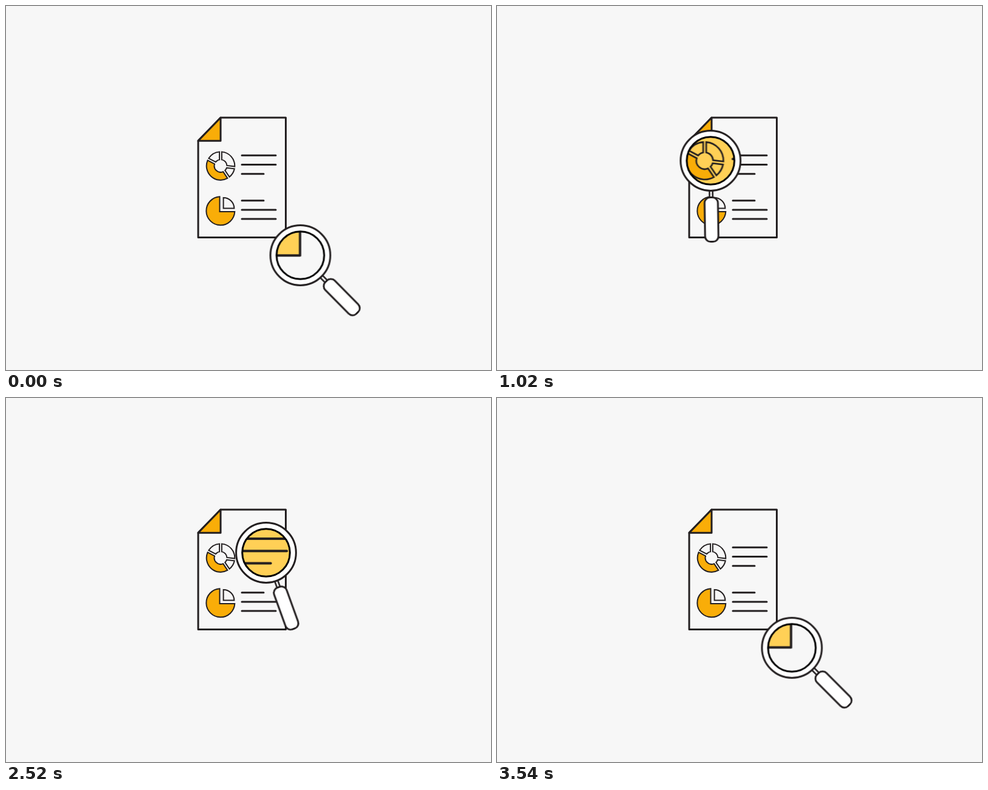
These frames come from a looping animation (800 by 600 pixels, 3.73 s). An HTML page:

```html
<!DOCTYPE html>
<html lang="en">
<head>
<meta charset="utf-8">
<title>Report under a magnifying glass</title>
<style>
  html, body { margin: 0; width: 100%; height: 100%; overflow: hidden; background: #f7f7f7; }
  svg { display: block; width: 100vw; height: 100vh; }
  .ink { stroke: #231f20; stroke-width: 3; stroke-linejoin: round; stroke-linecap: round; }
  .chart { stroke-width: 2; stroke-linejoin: miter; }
  .hot { fill: #f9ad08; }
  .white { fill: #fff; }
</style>
</head>
<body>
<svg viewBox="0 0 800 600">
  <defs>
    <clipPath id="glass"><circle r="39.3"/></clipPath>
    <g id="page" class="ink" fill="currentColor">
      <path d="M354 184H461.5V381.5H317V222Z"/>
      <path class="hot" d="M354 184V222.3H317Z"/>
      <g id="donut" class="chart" transform="translate(354 263.6)"></g>
      <g class="chart">
        <path class="hot" d="M352.5 339V314.3A23.5 23.5 0 1 0 377.3 339Z"/>
        <path d="M358.6 333.4V316A17.8 17.8 0 0 1 376.4 333.4Z"/>
      </g>
      <path d="M389 246.2h56M389 261.5h56M389 276.7h36M389 320.8h36M389 336h56M389 351h56"/>
    </g>
  </defs>

  <use href="#page" color="#f7f7f7"/>

  <g id="lens">
    <g id="handle" class="ink white">
      <path d="M-2.6 47V64H2.6V47Z" stroke-width="2.6"/>
      <rect x="-11" y="60.6" width="22" height="73" rx="9"/>
    </g>
    <circle class="ink white" r="49.4"/>
    <circle r="39.3" fill="#f7f7f7"/>
    <g clip-path="url(#glass)">
      <g id="view">
        <use href="#page" color="#ffd056"
             transform="translate(389.25 290) scale(1.325) translate(-389.25 -290)"/>
      </g>
    </g>
    <circle r="39.3" fill="none" stroke="#000" stroke-width="3"/>
  </g>
</svg>
<script>
  const $ = id => document.getElementById(id);

  // Ring slices separated by parallel gaps.
  const GAP = 1.9, OUTER = 23.3, INNER = 10.4;
  const cuts = [-90, 7, 56, 208, 270].map(d => d * Math.PI / 180);
  const at = (r, cut, side) => {
    const a = cut + side * Math.asin(GAP / r);
    return `${r * Math.cos(a)} ${r * Math.sin(a)}`;
  };
  for (let i = 0; i < 4; i++) {
    const [a, b] = [cuts[i], cuts[i + 1]];
    const slice = document.createElementNS($('donut').namespaceURI, 'path');
    slice.setAttribute('d',
      `M${at(INNER, a, 1)}L${at(OUTER, a, 1)}` +
      `A${OUTER} ${OUTER} 0 0 1 ${at(OUTER, b, -1)}` +
      `L${at(INNER, b, -1)}A${INNER} ${INNER} 0 0 0 ${at(INNER, a, 1)}Z`);
    if (i === 2) slice.setAttribute('class', 'hot');
    $('donut').append(slice);
  }

  // time in ms, lens centre, handle tilt
  const LOOP = 3730;
  const stops = [
    [0, 486.5, 412, 45],
    [16, 486.5, 412, 45],
    [908, 348.5, 255, 0],
    [2692, 429.4, 255, 20],
    [3584, 486.5, 412, 45],
    [LOOP, 486.5, 412, 45]
  ];
  const play = (id, pose) => {
    const anim = $(id).animate(
      stops.map(([t, x, y, tilt]) => ({
        offset: t / LOOP, easing: 'ease', transform: pose(x, y, tilt)
      })),
      { duration: LOOP, iterations: Infinity });
    anim.startTime = document.timeline.currentTime;
  };
  play('lens', (x, y) => `translate(${x}px, ${y}px)`);
  play('view', (x, y) => `translate(${-x}px, ${-y}px)`);
  play('handle', (x, y, tilt) => `rotate(${-tilt}deg)`);
</script>
</body>
</html>
```
